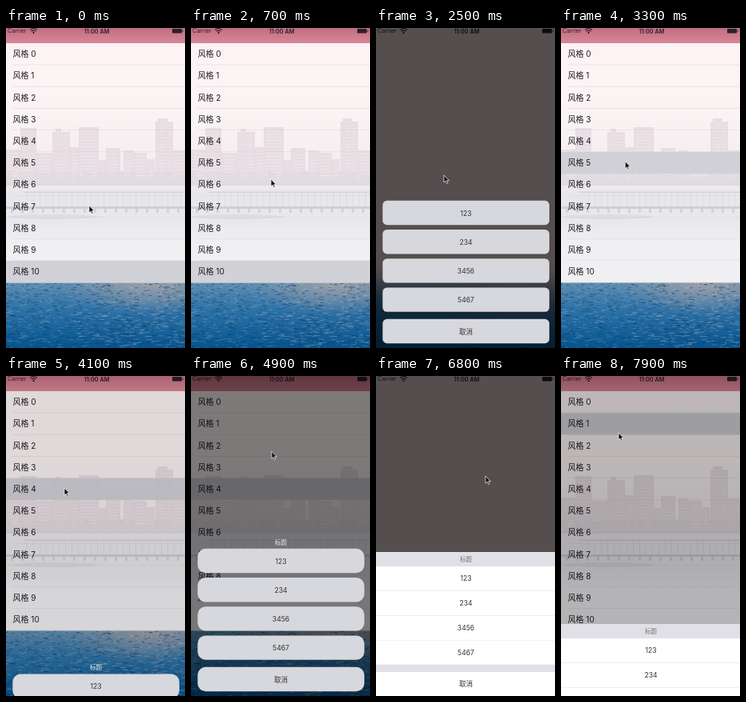
These frames come from a looping animation (224 by 400 pixels, 8 s). An HTML page:

```html
<!DOCTYPE html>
<html lang="zh">
<head>
<meta charset="utf-8">
<style>
html, body { margin: 0; width: 100%; height: 100%; overflow: hidden; background: #eee; }
svg { display: block; width: 224px; height: 400px; }
text { font-family: Inter, "Noto Sans CJK SC", "Noto Sans CJK", sans-serif; font-size: 8.6px; fill: #333; }
.mid { text-anchor: middle; }
.row { font-size: 10px; fill: #1c1c1e; }
.status text { font-size: 7.2px; fill: #2a2028; }
</style>
</head>
<body>
<svg id="stage" viewBox="0 0 224 400">
  <defs>
    <linearGradient id="top" x2="0" y2="1"><stop stop-color="#b8657a"/><stop offset="1" stop-color="#d98797"/></linearGradient>
    <linearGradient id="sky" x2="0" y2="1">
      <stop stop-color="#fdf3f4"/><stop offset=".3" stop-color="#faf3f4"/><stop offset=".55" stop-color="#f3ecef"/>
      <stop offset=".64" stop-color="#e8e6eb"/><stop offset=".74" stop-color="#e8e8ec"/><stop offset=".84" stop-color="#f0eff3"/><stop offset="1" stop-color="#f1f0f4"/>
    </linearGradient>
    <linearGradient id="sea" gradientUnits="userSpaceOnUse" x1="0" y1="318" x2="0" y2="400">
      <stop stop-color="#5f8cae"/><stop offset=".4" stop-color="#2f73a8"/><stop offset="1" stop-color="#07548f"/>
    </linearGradient>
    <radialGradient id="glow"><stop stop-color="#d8b3a4" stop-opacity=".5"/><stop offset="1" stop-color="#d8b3a4" stop-opacity="0"/></radialGradient>
  </defs>
  <g id="scene"></g>
  <g class="status">
    <text x="2" y="6.4">Carrier</text>
    <path d="M30 2.5q4.5-4 9 0M31.7 4.3q2.8-2.4 5.6 0" fill="none" stroke="#2a2028" stroke-width="1.1"/>
    <circle cx="34.5" cy="6" r="1"/>
    <text class="mid" x="113.5" y="6.6" font-weight="600">11:00 AM</text>
    <rect x="208" y="1" width="12" height="5.4" rx="1" fill="#2a2028"/>
    <rect x="220.6" y="2.6" width="1" height="2.2" fill="#2a2028"/>
  </g>
  <rect id="dim" width="224" height="400"/>
  <g id="sheet"></g>
  <path id="cursor" d="M0 0V9L2.1 7.2 3.6 10.4 5 9.8 3.6 6.6H6.4Z" fill="#111" stroke="#fff" stroke-width=".7"/>
</svg>
<script>
const $ = id => document.getElementById(id);
const rect = (x, y, w, h, fill, more = '') =>
  `<rect x="${x}" y="${y}" width="${w}" height="${h}" fill="${fill}" ${more}/>`;
const label = (y, s, more = '') => `<text class="mid" x="112.5" y="${y + 3.1}" ${more}>${s}</text>`;
const wide = (y, h, fill, more) => rect(-60, y, 344, h, fill, more);

let seed = 7;
const rnd = () => (seed = seed * 16807 % 2147483647) / 2147483647;

const ROW = 27.2, TOP = 19;

function buildScene() {
  let s = wide(-60, 60, '#f3e9ec') + wide(-6, 25, 'url(#top)') + wide(TOP, 299.2, 'url(#sky)');
  // skyline: x, top, width
  const towers = [[0, 152, 18], [18, 125, 20], [38, 156, 20], [58, 130, 22], [62, 126, 7], [80, 149, 12],
    [91, 124, 25], [116, 165, 9], [125, 150, 18], [147, 153, 13], [160, 156, 16], [176, 164, 10],
    [187, 117, 22], [190, 113, 12], [209, 153, 15]];
  for (const [x, y, w] of towers) {
    s += rect(x, y, w, 196 - y, '#e7dde2');
    for (let v = y + 4; v < 185; v += 4) s += rect(x + 2, v, w - 4, 1, '#eee5e9');
  }
  for (let x = -4; x < 224; x += 5) {
    const h = 5 + rnd() * 13;
    s += rect(x, 196 - h, 6, h, '#e2dce1');
  }
  s += wide(194, 3, '#dddbe1') + rect(22, 204.5, 210, 1.5, '#d3d3d9') + rect(0, 223, 224, 3, '#cfcfd6');
  for (let x = 26; x < 224; x += 8) s += rect(x, 206, 1, 17, '#dcdce1');
  for (let x = 6; x < 224; x += 13) s += rect(x, 226, 3, 5, '#d3d3da');
  s += '<ellipse cx="58" cy="236" rx="58" ry="3" fill="#dddde3"/>';

  s += wide(318.2, 150, 'url(#sea)') + '<ellipse cx="180" cy="322" rx="110" ry="38" fill="url(#glow)"/>' +
    wide(270, 48.2, '#f0f0f3');
  for (let i = 0; i < 1100; i++) {
    const d = rnd(), x = rnd() * 230 - 6, y = 319 + d * 81, w = 2 + rnd() * (3 + 4 * d);
    const light = x > 110 ? '#c4b8b0' : '#82b0cc';
    s += rect(x.toFixed(1), y.toFixed(1), w.toFixed(1), .9,
      rnd() < .55 ? '#04396b' : light, `opacity="${(.5 - .15 * d).toFixed(2)}"`);
  }
  s += rect(0, 0, 224, ROW, '#cfcfd5', 'id="mark" opacity=".9"');
  for (let i = 0; i < 11; i++) {
    const y = TOP + i * ROW;
    s += rect(8, y + ROW - .5, 216, .5, '#d8d5d9') + `<text class="row" x="8.5" y="${y + 17.2}">风格 ${i}</text>`;
  }
  $('scene').innerHTML = s + wide(-60, 378.2, '#f3e0e4', 'id="frost"');
}

const items = ['123', '234', '3456', '5467'];

function cards(r, title) {
  const card = (y, s) => rect(8.3, y - 15.8, 208.6, 30.4, '#d7d8dd', `rx="${r}"`) + label(y, s);
  return (title ? label(207.5, '标题', 'style="fill:#e6e8ec;font-size:7.6px"') : '') +
    items.map((s, i) => card(231.6 + 36.2 * i, s)).join('') + card(379.6, '取消');
}

function panel() {
  return rect(0, 220, 224, 180, '#e1e0e6') + label(229, '标题', 'style="fill:#777;font-size:7.6px"') +
    items.map((s, i) => rect(0, 238 + 30.8 * i, 224, 30.3, '#fff') + label(253.2 + 30.8 * i, s)).join('') +
    rect(0, 370, 224, 30, '#fff') + label(384.8, '取消');
}

const shows = [
  { row: 5, open: 1500, close: 3000, blur: true, h: 190, html: cards(5.5, false) },
  { row: 4, open: 3980, close: 4900, blur: false, h: 200, html: cards(10, true) },
  { row: 2, open: 5900, close: 7000, blur: true, h: 180, html: panel() },
  { row: 1, open: 7700, close: 9000, blur: false, h: 180, html: panel() }
];

// cursor stops: time, x, y
const path = [[0, 104, 222], [1000, 99, 180], [1600, 99, 180], [2300, 85, 184], [3000, 85, 184], [3700, 73, 140],
  [4150, 73, 140], [4600, 100, 95], [4800, 100, 95], [5300, 108, 88], [5900, 108, 88], [6700, 137, 125],
  [7050, 137, 125], [7600, 72, 71], [8000, 72, 71]];

const ease = u => (u = Math.min(1, Math.max(0, u)), u * u * (3 - 2 * u));

function cursorAt(t) {
  const i = path.findIndex(p => p[0] > t), [t0, x0, y0] = path[i - 1], [t1, x1, y1] = path[i];
  const k = ease((t - t0) / (t1 - t0));
  return [x0 + (x1 - x0) * k, y0 + (y1 - y0) * k];
}

let shown = null;

function draw(t) {
  const cur = shows.filter(s => t >= s.open - 150).pop();
  let p = 0, b = 0, row = 10;
  if (cur) {
    const out = 1 - ease((t - cur.close) / 300);
    p = ease((t - cur.open) / 400) * out;
    if (cur.blur) b = ease((t - cur.open + 150) / 600) * out;
    row = cur.row;
    if (shown !== cur) $('sheet').innerHTML = (shown = cur).html;
    $('sheet').setAttribute('transform', `translate(0 ${cur.h * (1 - p)})`);
  }
  $('sheet').style.display = p > 0 ? '' : 'none';
  $('dim').setAttribute('opacity', p * (cur && cur.blur ? .65 : .5));
  $('scene').style.filter = b > 0 ? `blur(${b * 15}px)` : 'none';
  $('frost').setAttribute('opacity', b);
  $('mark').setAttribute('y', TOP + row * ROW);
  $('mark').style.display = b > 0 ? 'none' : '';
  $('cursor').setAttribute('transform', `translate(${cursorAt(t)})`);
}

buildScene();
const start = performance.now();
function tick() {
  draw(Math.floor((performance.now() - start) % 8000 / 100) * 100);
  requestAnimationFrame(tick);
}
tick();
</script>
</body>
</html>
```
